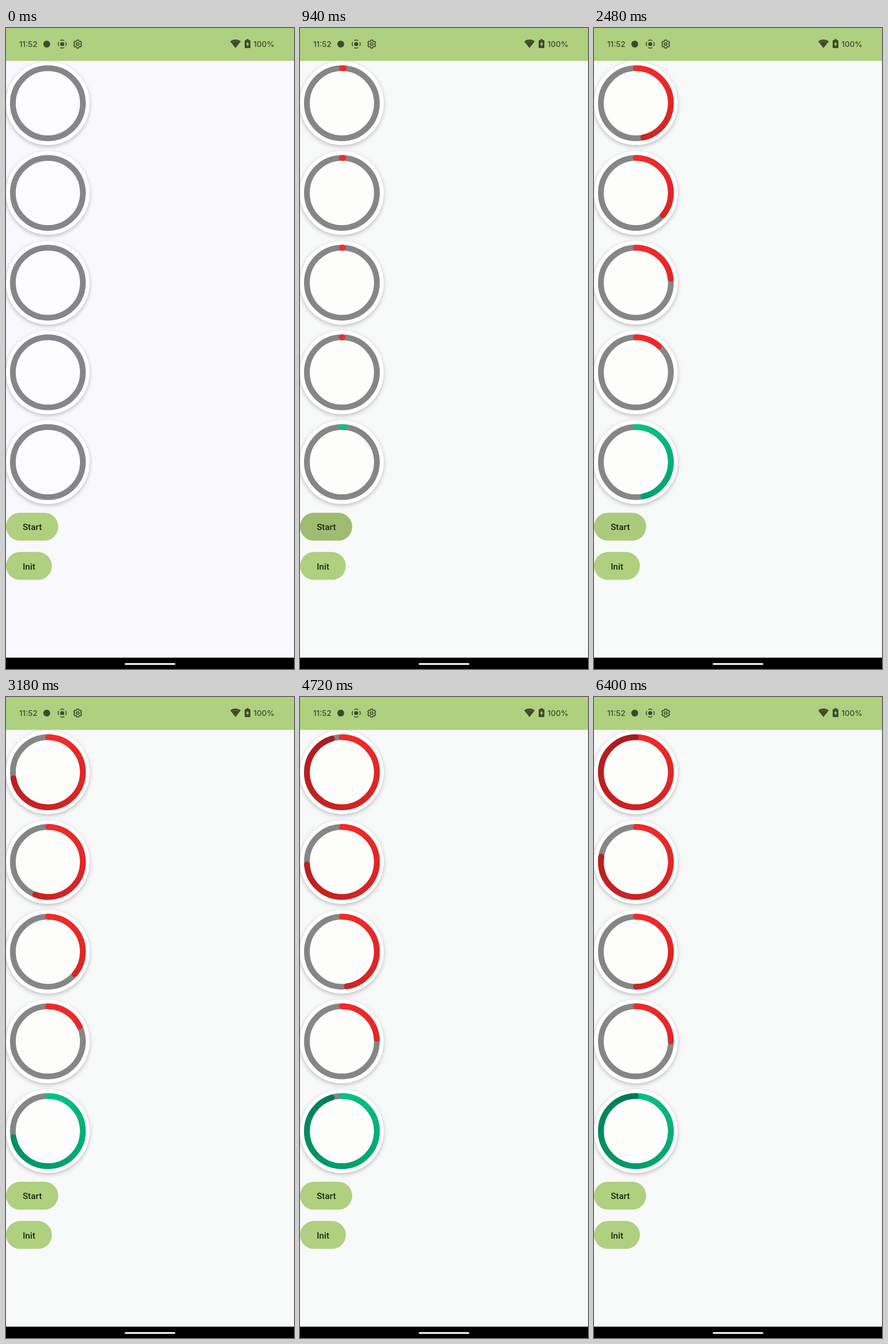
These frames come from a looping animation (502 by 1116 pixels, 8 s). An HTML page with a canvas:

```html
<!DOCTYPE html>
<html lang="en">
<head>
<meta charset="utf-8">
<title>Progress rings</title>
<style>
  html, body { margin: 0; width: 100%; height: 100%; overflow: hidden; background: #f9f9f9; }
  canvas { display: block; }
</style>
</head>
<body>
<canvas id="stage" width="502" height="1116"></canvas>
<script>
const ctx = document.getElementById('stage').getContext('2d');
const LOOP = 8000;
const TAU = Math.PI * 2;
const TOP = -Math.PI / 2;
const GREEN = '#afd07f';
const ICON = '#3e4a2e';

const RED_SWEEP = [[246, 42, 40], [168, 26, 28]];
const GREEN_SWEEP = [[0, 196, 131], [0, 120, 84]];
const RINGS = [
  { goal: 1, sweep: RED_SWEEP },
  { goal: 0.774, sweep: RED_SWEEP },
  { goal: 0.5, sweep: RED_SWEEP },
  { goal: 0.25, sweep: RED_SWEEP },
  { goal: 1, sweep: GREEN_SWEEP }
];

const clamp = v => Math.min(1, Math.max(0, v));
const mix = ([a, b], k) => `rgb(${a.map((v, i) => Math.round(v + (b[i] - v) * k))})`;

// Cubic bezier (0.4, 0, 0.2, 1), solved by bisection.
function ease(x) {
  if (x <= 0 || x >= 1) return clamp(x);
  let lo = 0, hi = 1, s = 0.5;
  for (let i = 0; i < 24; i++) {
    s = (lo + hi) / 2;
    const r = 1 - s;
    if (1.2 * s * r * r + 0.6 * s * s * r + s * s * s < x) lo = s; else hi = s;
  }
  return s * s * (3 - 2 * s);
}

// Steps come in threes, held for 20, 20 and 100 ms.
function stepAt(t) {
  const k = Math.max(0, t - 480);
  const rest = k % 140;
  const n = Math.floor(k / 140) * 3 + (rest < 20 ? 0 : rest < 40 ? 1 : 2);
  return Math.min(n, 128);
}

function disc(x, y, r, fill) {
  ctx.beginPath();
  ctx.arc(x, y, r, 0, TAU);
  ctx.fillStyle = fill;
  ctx.fill();
}

function arc(x, y, r, from, to, width, stroke) {
  ctx.beginPath();
  ctx.arc(x, y, r, from, to);
  ctx.lineWidth = width;
  ctx.strokeStyle = stroke;
  ctx.stroke();
}

function pill(x, y, w, h, r) {
  ctx.beginPath();
  ctx.roundRect(x, y, w, h, r);
}

function polygon(points, fill) {
  ctx.beginPath();
  points.forEach(([x, y]) => ctx.lineTo(x, y));
  ctx.closePath();
  ctx.fillStyle = fill;
  ctx.fill();
}

function text(label, x, y, font, fill, spacing = '0px') {
  ctx.font = font;
  ctx.letterSpacing = spacing;
  ctx.fillStyle = fill;
  ctx.fillText(label, x, y);
}

function drawRing({ goal, sweep }, cy, progress, idle) {
  const cx = 73, r = 61, width = 10;
  ctx.save();
  ctx.shadowColor = 'rgba(0,0,0,0.24)';
  ctx.shadowBlur = 7;
  ctx.shadowOffsetY = 2.5;
  disc(cx, cy, 73, '#fff');
  ctx.restore();
  disc(cx, cy, r, idle ? '#fdfcff' : '#fdfefc');
  arc(cx, cy, r, 0, TAU, width, idle ? '#868589' : '#868686');

  const part = goal * progress;
  if (part <= 0) return;
  const cap = k => disc(
    cx + r * Math.cos(TOP + k * TAU), cy + r * Math.sin(TOP + k * TAU),
    width / 2, mix(sweep, k));
  const paint = ctx.createConicGradient(TOP, cx, cy);
  paint.addColorStop(0, mix(sweep, 0));
  paint.addColorStop(1, mix(sweep, 1));
  arc(cx, cy, r, TOP, TOP + part * TAU, width, paint);
  const caps = part < 1 ? [part, 0] : [0, part];
  caps.forEach(cap);
}

function drawButton(label, y, w, step) {
  pill(0, y, w, 48.5, 24.25);
  ctx.fillStyle = GREEN;
  ctx.fill();
  if (step !== undefined) drawRipple(y + 25, step);
  text(label, 29.2, y + 30.3, '500 15px Roboto, sans-serif', '#17230a', '0.1px');
}

// Fills the current path with a spreading, then fading, touch ripple.
function drawRipple(cy, step) {
  const alpha = clamp((step - 1) / 4) * clamp((50 - step) / 24);
  if (alpha <= 0) return;
  const radius = 20 + 7 * step;
  const glow = ctx.createRadialGradient(56, cy, 0, 56, cy, radius);
  const tone = k => `rgba(30,50,0,${0.125 * alpha * k})`;
  glow.addColorStop(0, tone(1));
  glow.addColorStop(clamp(0.3 + step / 36), tone(1));
  glow.addColorStop(1, tone(step > 20 ? 1 : 0));
  ctx.fillStyle = glow;
  ctx.fill();
}

function drawGear(x, y) {
  ctx.beginPath();
  for (let i = 0; i < 6; i++) {
    const a = TOP + i * TAU / 6;
    [[-0.36, 5.5], [-0.22, 7.2], [0.22, 7.2], [0.36, 5.5]].forEach(([d, r]) =>
      ctx.lineTo(x + r * Math.cos(a + d), y + r * Math.sin(a + d)));
  }
  ctx.closePath();
  ctx.lineJoin = 'round';
  ctx.lineWidth = 1.6;
  ctx.strokeStyle = ICON;
  ctx.stroke();
  arc(x, y, 2.3, 0, TAU, 1.6, ICON);
}

function drawWifi(x, y) {
  ctx.beginPath();
  ctx.moveTo(x, y);
  ctx.arc(x, y, 15, TOP - 0.66, TOP + 0.66);
  ctx.closePath();
  ctx.fillStyle = ICON;
  ctx.fill();
  arc(x, y, 11.8, TOP - 0.5, TOP + 0.5, 0.7, '#70864f');
}

function drawBattery(x, y) {
  ctx.fillStyle = ICON;
  ctx.fillRect(x - 2, y - 8, 4, 2);
  pill(x - 5, y - 6.5, 10, 14, 1.5);
  ctx.fill();
  polygon([[x + 0.6, y - 4], [x - 2.7, y + 1.2], [x - 0.5, y + 1.2],
    [x - 0.5, y + 5], [x + 2.7, y - 0.4], [x + 0.6, y - 0.4]], GREEN);
}

function drawStatusBar() {
  const font = '500 13.5px Inter, sans-serif';
  ctx.fillStyle = GREEN;
  ctx.fillRect(0, 0, 502, 57.3);
  text('11:52', 23, 33, font, ICON);
  disc(71, 28, 6, ICON);
  disc(98, 28, 3.6, ICON);
  for (let i = 0; i < 4; i++) {
    const a = i * TAU / 4;
    arc(98, 28, 6.9, a - 0.55, a + 0.55, 1.5, ICON);
  }
  drawGear(125, 28);
  drawWifi(400, 35);
  drawBattery(421, 27.5);
  text('100%', 431.5, 33, font, ICON);
}

function drawNavBar() {
  ctx.fillStyle = '#000';
  ctx.fillRect(0, 1096.3, 502, 20);
  pill(207, 1105.7, 88, 3, 1.5);
  ctx.fillStyle = '#fff';
  ctx.fill();
}

function render() {
  const t = performance.now() % LOOP;
  const idle = t < 500;
  const step = stepAt(t);
  const progress = ease((step - 3.6) / 120);

  ctx.fillStyle = idle ? '#f9f8fc' : '#f8f9f9';
  ctx.fillRect(0, 0, 502, 1116);
  RINGS.forEach((ring, i) => drawRing(ring, 131 + 156.2 * i, progress, idle));
  drawButton('Start', 844, 91, step);
  drawButton('Init', 912.3, 80);
  drawStatusBar();
  drawNavBar();
  requestAnimationFrame(render);
}

render();
</script>
</body>
</html>
```
